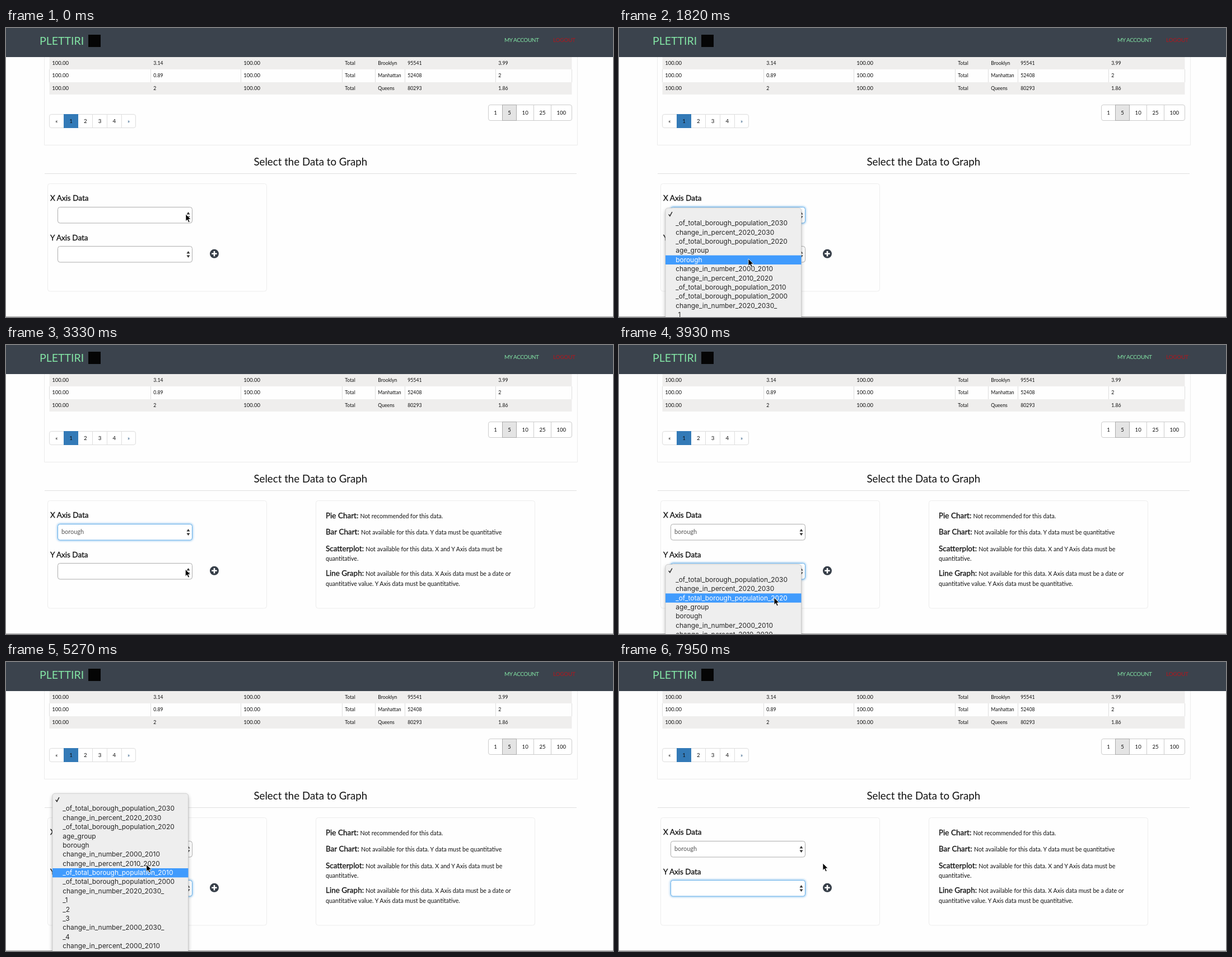
These frames come from a looping animation (1084x517 px, 8 s). An HTML page:

```html
<!DOCTYPE html>
<html lang="en">
<head>
<meta charset="utf-8">
<title>Select the Data to Graph</title>
<style>
  html, body { margin: 0; width: 100%; height: 100%; overflow: hidden; background: #fefefe; }
  svg { display: block; width: 100vw; height: 100vh; }
  text { font-family: Lato, "Open Sans", sans-serif; fill: #111; white-space: pre; }
  .menu text { font-family: Inter, Roboto, sans-serif; font-size: 11.9px; fill: #262626; }
  .cell { font-size: 8.7px; }
  .num { font-size: 9.5px; }
  .page { font-size: 9.6px; text-anchor: middle; }
  .strong { font-size: 13.5px; stroke: #111; stroke-width: .3px; }
  .note { font-size: 10.6px; }
</style>
</head>
<body>
<svg id="stage" viewBox="0 0 1084 517" preserveAspectRatio="none"></svg>
<script>
const NS = "http://www.w3.org/2000/svg";
const LOOP = 8000, STEP = 150, HOVER_LAG = 30;
const ROW = 16.37, FIRST_ROW = 19.2, MENU_X = 83, MENU_W = 242.5;
const stage = document.getElementById("stage");

function add(parent, tag, attrs = {}, content) {
  const node = document.createElementNS(NS, tag);
  for (const key in attrs) node.setAttribute(key, attrs[key]);
  if (content !== undefined) node.textContent = content;
  return parent.appendChild(node);
}
const group = (parent = stage, attrs) => add(parent, "g", attrs);
const rect = (parent, x, y, width, height, attrs) => add(parent, "rect", { x, y, width, height, ...attrs });
const label = (parent, x, y, content, attrs) => add(parent, "text", { x, y, ...attrs }, content);
const path = (parent, d, attrs) => add(parent, "path", { d, ...attrs });
const show = (node, on) => node.setAttribute("visibility", on ? "visible" : "hidden");

const defs = add(stage, "defs");
function blur(id, amount) {
  const filter = add(defs, "filter", { id, x: "-20%", y: "-40%", width: "140%", height: "180%" });
  add(filter, "feGaussianBlur", { stdDeviation: amount });
}
blur("soft", 3.5);
blur("glow", 1.8);

function buildTable() {
  const columns = [77.5, 258.5, 419.5, 600.5, 659.5, 712.5, 874.5];
  const rows = [
    ["100.00", "3.14", "100.00", "Total", "Brooklyn", "95541", "3.99"],
    ["100.00", "0.89", "100.00", "Total", "Manhattan", "52408", "2"],
    ["100.00", "2", "100.00", "Total", "Queens", "80293", "1.86"]
  ];
  const pitch = 22.4;
  path(stage, "M68.5 52V209.5H1020.5V52", { fill: "none", stroke: "#ececec" });
  rows.forEach((row, r) => {
    const y = Math.round(52 + r * pitch);
    if (r % 2 === 0) rect(stage, 77.5, y, 933, 22, { fill: "#efeeed" });
    else columns.concat(1010.5).forEach(x => path(stage, `M${x} ${y}v23`, { stroke: "#dedede" }));
    row.forEach((value, c) => label(stage, columns[c] + 4.8, 65.8 + r * pitch, value,
      { class: value === "100.00" ? "num" : "cell" }));
  });
}

// Row of joined buttons, each as wide as its name plus padding.
function buttons(left, y, height, pad, names, fill, edge, border) {
  const edges = [left];
  names.forEach((name, i) => edges.push(edges[i] + pad + 5.8 * name.length));
  const snapped = edges.map(x => Math.floor(x) + .5);
  rect(stage, left, y, snapped[names.length] - left, height, { rx: 3.5, fill: "#fff", stroke: border });
  snapped.slice(1, -1).forEach(x => path(stage, `M${x} ${y}v${height}`, { stroke: border }));
  rect(stage, snapped[1], y, snapped[2] - snapped[1], height, { fill, stroke: edge });
  names.forEach((name, i) => label(stage, (edges[i] + edges[i + 1]) / 2, y + height / 2 + 3.2, name,
    { class: "page", style: name === "»" ? "fill:#23527c" : "" }));
}

function buildHeader() {
  rect(stage, 0, 0, 1084, 52, { fill: "#3b434d" });
  label(stage, 60, 30, "PLETTIRI", { style: "font-size:19.5px;fill:#83e5a5" });
  rect(stage, 147, 12, 22, 22, { fill: "#050505" });
  label(stage, 890, 24.6, "MY ACCOUNT", { style: "font-size:10px;letter-spacing:-.45px;fill:#83e5a5" });
  label(stage, 977, 24.6, "LOGOUT", { style: "font-size:10px;letter-spacing:-.3px;fill:#b5151c" });
}

function panel(parent, x) {
  rect(parent, x, 278.5, 391, 192.5, { rx: 4, fill: "none", stroke: "#ededed" });
}

function select(y) {
  const g = group();
  const halo = rect(g, 92, y - .5, 241, 29.5, { rx: 4.5, fill: "none", stroke: "#66afe9", "stroke-width": 3,
    opacity: .55, filter: "url(#glow)" });
  const box = rect(g, 92.5, y, 240, 28.5, { rx: 4, fill: "#fff" });
  path(g, `M322.5 ${y + 13}l3-4.6 3 4.6zM322.5 ${y + 16}l3 4.6 3-4.6z`, { fill: "#333" });
  return focused => {
    show(halo, focused);
    box.setAttribute("stroke", focused ? "#66afe9" : "#adadad");
  };
}

function buildAdvice() {
  const g = group();
  panel(g, 553.5);
  const none = "Not available for this data. ";
  const notes = [
    ["Pie Chart:", "Not recommended for this data."],
    ["Bar Chart:", none + "Y data must be quantitative"],
    ["Scatterplot:", none + "X and Y Axis data must be", "quantitative."],
    ["Line Graph:", none + "X Axis data must be a date or", "quantitative value. Y Axis data must be quantitative."]
  ];
  let y = 310;
  for (const [name, first, second] of notes) {
    const line = label(g, 571, y);
    add(line, "tspan", { class: "strong" }, name);
    add(line, "tspan", { class: "note", dx: 3.2 }, first);
    if (second) label(g, 571, y + 17.4, second, { class: "note" });
    y += second ? 44.5 : 29.3;
  }
  return g;
}

function buildMenu() {
  const total = "_of_total_borough_population_", number = "change_in_number_", percent = "change_in_percent_";
  const items = [
    total + "2030", percent + "2020_2030", total + "2020", "age_group", "borough",
    number + "2000_2010", percent + "2010_2020", total + "2010", total + "2000",
    number + "2020_2030_", "_1", "_2", "_3", number + "2000_2030_", "_4", percent + "2000_2010"
  ];
  const g = group(stage, { class: "menu" });
  rect(g, MENU_X, 3, MENU_W, 330, { rx: 5, fill: "#000", opacity: .3, filter: "url(#soft)" });
  rect(g, MENU_X, 0, MENU_W, 330, { rx: 4.5, fill: "#eeeeee", stroke: "#c2c2c2", "stroke-width": .7 });
  const bar = rect(g, MENU_X, 0, MENU_W, ROW, { fill: "#409bfd" });
  const mark = path(g, "M88.7 11.4l2.2 3 4-7.4", { fill: "none", "stroke-width": 1.5 });
  const lines = items.map((name, i) => label(g, 101.3, 31.3 + i * ROW, name));
  return (top, chosen, opacity) => {
    show(g, opacity > 0);
    show(bar, opacity > 0 && chosen !== null);
    g.setAttribute("opacity", opacity);
    g.setAttribute("transform", `translate(0 ${top})`);
    if (chosen !== null) bar.setAttribute("y", FIRST_ROW + chosen * ROW);
    mark.setAttribute("stroke", chosen === -1 ? "#fff" : "#262626");
    lines.forEach((line, i) => line.style.fill = i === chosen ? "#fff" : "");
  };
}

buildTable();
buttons(77.5, 154.5, 24, 19.92, ["«", "1", "2", "3", "4", "»"], "#337ab7", "#337ab7", "#dddddd");
buttons(861.5, 137.5, 28, 19.3, ["1", "5", "10", "25", "100"], "#e4e4e4", "#adadad", "#cccccc");
buildHeader();
label(stage, 442.5, 245.5, "Select the Data to Graph", { style: "font-size:18.7px" });
path(stage, "M69 260.5H1019", { stroke: "#dfdfdf" });
panel(stage, 74.5);
label(stage, 79, 309, "X Axis Data", { class: "strong" });
label(stage, 79, 379.6, "Y Axis Data", { class: "strong" });
const focusX = select(320.5), focusY = select(390.5);
const value = label(stage, 99, 337.6, "borough", { style: "font-size:10.9px;fill:#555" });
add(stage, "circle", { cx: 372, cy: 403.8, r: 8, fill: "#353d47" });
path(stage, "M367.3 403.8h9.4M372 399.1v9.4", { stroke: "#fff", "stroke-width": 2.6 });
const advice = buildAdvice();
path(stage, "M0 516.5H1084", { stroke: "#a2a2a2" });
const drawMenu = buildMenu();
const cursor = path(stage, "M0 0V12.6L2.9 9.9 5 14.8 7.2 13.8 5.1 9.1H9.1Z",
  { fill: "#000", stroke: "#fff", "stroke-width": .8 });

const OPEN_X = 140, PICK_X = 2570, OPEN_Y = 3630, SCROLL_Y = 4230, CLOSE_Y = 7810;

// Pointer glides, sampled once per STEP from the first to the last time.
const glides = [
  { from: 140, to: 770, x: 277, y: 346 },
  { from: 1220, to: 1220, x: 266, y: 347 },
  { from: 1370, to: 1820, x: 231, y: 413 },
  { from: 2120, to: 2120, x: 232, y: 416 },
  { from: PICK_X, to: PICK_X, x: 243, y: 415 },
  { from: 2870, to: 3480, x: 322, y: 401 },
  { from: OPEN_Y, to: 3930, x: 277, y: 452 },
  { from: 4980, to: 5560, x: 247.5, y: 351 },
  { from: 6160, to: 6160, x: 247, y: 347 },
  { from: 6310, to: 6310, x: 247, y: 349 },
  { from: 7660, to: 7660, x: 364, y: 360 }
];
const easeOut = p => 1 - (1 - p) ** 2.4;

function pointer(t) {
  let x = 321, y = 333;
  for (const g of glides) {
    if (t < g.from) break;
    const gaps = Math.round((g.to - g.from) / STEP);
    const done = t >= g.to ? gaps : Math.floor((t - g.from) / (g.to - g.from) * gaps);
    const p = easeOut((done + 1) / (gaps + 1));
    x += (g.x - x) * p;
    y += (g.y - y) * p;
  }
  return { x, y };
}

function hoveredRow(t, top) {
  const { x, y } = pointer(t - HOVER_LAG);
  const inside = x >= MENU_X && x <= MENU_X + MENU_W && y >= top;
  return inside ? Math.max(-1, Math.floor((y - top - FIRST_ROW) / ROW)) : null;
}

function menuOpacity(t, open, close) {
  if (t < open || t >= close + STEP - 10) return 0;
  return t < close ? 1 : .36;
}

function draw(t) {
  const top = t < OPEN_Y ? 322 : t < SCROLL_Y ? 392.5 : 235.2;
  const opacity = t < OPEN_Y ? menuOpacity(t, OPEN_X, PICK_X) : menuOpacity(t, OPEN_Y, CLOSE_Y);
  drawMenu(top, hoveredRow(t, top), opacity);
  const { x, y } = pointer(t);
  cursor.setAttribute("transform", `translate(${x} ${y})`);
  focusX(t >= OPEN_X && t < OPEN_Y);
  focusY(t >= OPEN_Y);
  show(value, t >= PICK_X + STEP);
  show(advice, t >= PICK_X + 2 * STEP);
}

const start = performance.now();
function tick() {
  draw((performance.now() - start) % LOOP);
  requestAnimationFrame(tick);
}
tick();
</script>
</body>
</html>
```
